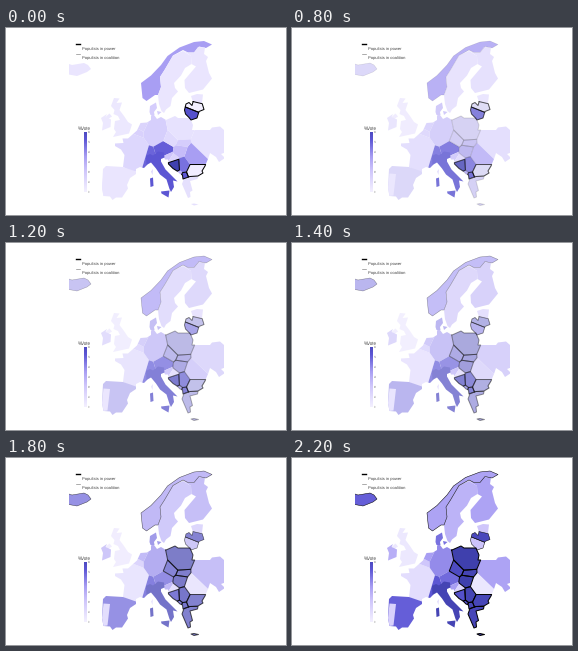
Write a matplotlib script that moves like this. It is 280 px wide and 187 px high and loops after 2.4 s.

```python
import numpy as np
import matplotlib.pyplot as plt
from matplotlib.animation import FuncAnimation
from matplotlib.colors import LinearSegmentedColormap
from matplotlib.patches import Polygon, Rectangle

plt.rcParams["font.family"] = "Liberation Sans"
plt.rcParams["text.hinting"] = "none"

W, H, STEPS = 280, 187, 12
PT = 0.72  # points per pixel at 100 dpi
THIN, BOLD = 0.5, 1.0

fig = plt.figure(figsize=(W / 100, H / 100), dpi=100, facecolor="white")
ax = fig.add_axes([0, 0, 1, 1])
ax.axis("off")

votes = LinearSegmentedColormap.from_list("votes", [
    (0, "#f3f0ff"), (0.3, "#cfc6fb"), (0.5, "#a99ff3"),
    (0.75, "#5c56d4"), (1, "#3a3ca6")])
window = Rectangle((63, 8), 155, 174, transform=ax.transData)
lands = []


def outline(ring, width):
    line = Polygon(ring, fill=False, ec="black", lw=width * PT,
                   joinstyle="round", zorder=3)
    ax.add_patch(line).set_clip_path(window)
    return line


def land(ring, before, after, old=0, new=0):
    """Vote share and border width at the start and at the end."""
    fill = Polygon(ring, lw=0, zorder=2)
    ax.add_patch(fill).set_clip_path(window)
    colors = [np.array(votes(v)[:3]) for v in (before, after)]
    lines = [outline(ring, w) if w else None for w in (old, new)]
    lands.append((fill, colors, lines))


def cut(ring, normal, limit):
    """Keep the part of a ring where normal . p <= limit."""
    kept = []
    for p, q in zip(ring, np.roll(ring, -1, axis=0)):
        dp, dq = p @ normal - limit, q @ normal - limit
        if dp <= 0:
            kept.append(p)
        if dp * dq < 0:
            kept.append(p + (q - p) * dp / (dp - dq))
    return np.array(kept)


def divide(ring, states):
    """Split a land mass into weighted Voronoi cells, one for each state."""
    for x, y, r, *style in states:
        cell = np.array(ring, float)
        for u, v, s, *_ in states:
            if (u, v) != (x, y) and len(cell):
                limit = (u * u + v * v - s * s - x * x - y * y + r * r) / 2
                cell = cut(cell, np.array([u - x, v - y]), limit)
        if len(cell):
            land(cell, *style)


# Mainland from Denmark's border clockwise; states: x, y, reach, style
divide(
    [(145, 87), (148, 87), (151, 91), (155, 89), (160, 92), (169, 88),
     (172, 90), (184, 90), (187, 97), (186, 102), (204, 102), (206, 99.5),
     (214, 98.5), (226, 109), (226, 122), (215, 126), (219, 130), (213, 134),
     (210, 129), (204, 125), (202, 131), (199, 138), (196, 143), (197, 145),
     (192, 148), (184, 148.5), (177, 151), (176.5, 147), (174, 146),
     (171, 143), (167, 140.5), (162.5, 136), (162, 131.5), (159, 131.5),
     (158, 129), (145, 128), (141, 137), (138, 140), (134, 139), (130, 141),
     (130, 143.5), (126, 143.5), (117, 139), (118.5, 127), (115, 121.5),
     (109, 118), (109, 115.5), (117.5, 115), (116.5, 110.5), (122, 110.5),
     (131, 102.5), (134.5, 95), (141, 94.5), (145, 92)],
    [(128, 120, 13.5, 0.18, 0.14),               # France
     (133.5, 105.5, 4.5, 0.22, 0.3),             # Belgium
     (137, 99, 5, 0.2, 0.5),                     # Netherlands
     (149.5, 105, 12, 0.24, 0.57),               # Germany
     (143, 124.5, 2, 0.7, 0.75),                 # Switzerland
     (158, 120, 8.2, 0.72, 0.68),                # Austria
     (161.5, 128, 4.5, 0.3, 0.5),                # Slovenia
     (167, 131.5, 4, 0.2, 0.2),                  # Croatia
     (205, 113, 17.7, 0.1, 0.48),                # Ukraine
     (190.5, 128, 10.9, 0.5, 0.07),              # Romania
     (163.5, 110.5, 8, 0.16, 0.85, 0, BOLD),     # Czechia
     (174, 100, 12, 0.1, 0.96, 0, BOLD),         # Poland
     (175, 115.5, 3.6, 0.25, 0.92, 0, BOLD),     # Slovakia
     (174, 122.5, 5.3, 0.35, 0.96, 0, BOLD),     # Hungary
     (178, 137, 6.5, 0.66, 0.92, 0, BOLD),       # Serbia
     (172.5, 144, 0, 0.4, 0.8, 0, BOLD),         # Montenegro
     (169, 137.5, 6, 0.95, 0.8, BOLD, BOLD),     # Bosnia
     (190.5, 143, 9.4, 0.02, 0.9, BOLD, BOLD),   # Bulgaria
     (179.5, 147.5, 0, 0.75, 0.9, BOLD, BOLD)])  # Macedonia

# Baltic states from north to south
divide(
    [(178.5, 82), (180, 76), (183, 74.5), (186, 77.5), (187, 74), (185, 68),
     (191, 66), (197, 66.5), (196, 75), (198, 81.5), (193, 83.5), (191, 90),
     (185, 92), (183, 89.5), (179.5, 86)],
    [(191, 70, 0, 0.08, 0.3), (189, 78.5, 0, 0, 0.88, BOLD, THIN),
     (186, 86, 0, 0.8, 0.32, BOLD, THIN)])

# Norway, then Sweden and Finland along its inner border
land([(140.5, 73), (136.5, 70), (135, 55), (145, 47.5), (155, 37), (161.5, 28),
      (173.5, 19.5), (188, 14), (198, 13), (206, 16.5), (200, 20), (193, 18.5),
      (188, 24.5), (182, 24.5), (177, 22), (167, 27.5), (158.5, 42), (154, 49),
      (155, 59), (152, 67), (149, 67)], 0.5, 0.48, 0, THIN)
land([(152, 67), (155, 59), (154, 49), (158.5, 42), (167, 27.5), (177, 23),
      (185, 28), (185.5, 36), (179, 40), (175, 47.5), (168, 55), (169, 60),
      (172, 63.5), (166, 70), (164.5, 78), (160, 81.5), (158, 85),
      (155.5, 83), (153, 76)], 0.08, 0.4)
land([(177, 22.5), (182, 24.5), (188, 24.5), (192, 19), (199, 19.5), (198, 26),
      (202, 29), (200, 33), (203, 45), (206, 50.5), (197, 61.5), (183, 65),
      (179, 60), (178.5, 52), (190, 38.5), (185.5, 36), (185, 28)], 0.08, 0.48)

# Denmark and Iceland
for part in ([(143.5, 84), (144.5, 87), (148.5, 87), (148, 84), (151, 80),
              (150, 74.5), (144, 78)], [(151, 83), (152, 87), (155.5, 84)]):
    land(part, 0.25, 0.66)
land([(60, 46), (71, 48), (81, 44), (85, 41), (82, 37), (78, 35), (66, 37),
      (60, 35)], 0.08, 0.72, 0, THIN)

# Britain and Ireland
for part in ([(113.5, 70.5), (110.5, 75), (116, 74.5), (113.5, 82), (118, 88),
              (122, 94), (126, 96.5), (123, 105.5), (107, 109), (110, 104),
              (108, 101), (109, 93), (114, 92), (112, 88), (107.5, 86),
              (108.5, 82), (105, 78), (108, 70)],
             [(106, 88.5), (102, 91), (99.5, 89), (103.5, 85.5)]):
    land(part, 0.06, 0.06)
land([(105, 91.5), (104.5, 99), (96, 102.5), (97, 95), (95, 90), (101, 86),
      (99.5, 89), (103, 90.5)], 0.06, 0.42)

# Spain and Portugal
land([(117, 139), (130, 143.5), (130, 146), (124, 150), (121, 157),
      (122, 160.5), (116, 169.5), (110, 169.5), (106.5, 172), (104, 168.5),
      (97.5, 168), (96, 160), (97, 141), (100, 138)], 0.08, 0.72)
land([(97.5, 145.5), (104, 146), (101.5, 167.5), (97.5, 168), (96, 160)],
     0.08, 0.22)

# Italy with Sicily and Sardinia, then Corsica
for part in ([(140, 128), (144, 126), (147, 127.5), (152, 123.5), (158, 124.5),
              (158.5, 129.5), (155, 131), (155, 133.5), (159.5, 141.5),
              (171.5, 153.5), (167, 152.5), (168, 159), (165, 164),
              (163.5, 161), (160.5, 151.5), (154, 146.5), (150, 140.5),
              (145, 134.5), (140.5, 137)],
             [(155, 163.5), (163.5, 162.5), (162.5, 169.5), (155.5, 165.5)],
             [(144, 150.5), (147, 149.5), (147.5, 158), (144.5, 159)]):
    land(part, 0.75, 0.92)
land([(145, 143.5), (147, 141), (146.5, 147)], 0.18, 0.14)

# Greece with Crete
for part in ([(176, 156), (178, 150.5), (184, 148.5), (192, 148.5),
              (191.5, 151), (184, 153), (186.5, 162.5), (184, 164),
              (184.5, 169), (182, 170), (179, 163)],
             [(185, 176), (188, 175.5), (192.5, 176.5), (188, 177.5)]):
    land(part, 0.12, 0.9, 0, BOLD)


def label(x, y, text, size, color="#444444"):
    ax.text(x, y, text, fontsize=size * PT, color=color, va="center_baseline")


# Legend and colour scale
for y, text, width, shade in ((16.4, "Populists in power", 1.4, "black"),
                              (26, "Populists in coalition", 0.6, "#777777")):
    ax.plot([70, 74], [y, y], color=shade, lw=width * PT)
    label(75.8, y + 4, text, 4.1)

label(72, 100, "%Vote", 4.5)
ax.imshow(np.linspace(0.85, 0, 120)[:, None], cmap=votes, vmin=0, vmax=1,
          extent=(78, 80.4, 164, 104), aspect="auto")
for i in range(7):
    label(82, 164 - 10 * i, str(10 * i), 2.5, "#888888")
ax.set_xlim(0, W)
ax.set_ylim(H, 0)


def draw(k):
    u = k / (STEPS - 1)
    fade_out, fade_in = 1 - u ** 1.5, u ** 2
    for fill, (start, end), (old, new) in lands:
        base = 1 - (1 - start) * fade_out
        fill.set_facecolor(base + (end - base) * fade_in)
        if old:
            old.set_alpha(fade_out ** 2)
        if new:
            new.set_alpha(fade_in)
    return []


draw(0)
anim = FuncAnimation(fig, draw, frames=STEPS, interval=200,
                     repeat=True, repeat_delay=0, blit=False)
plt.show()
```
